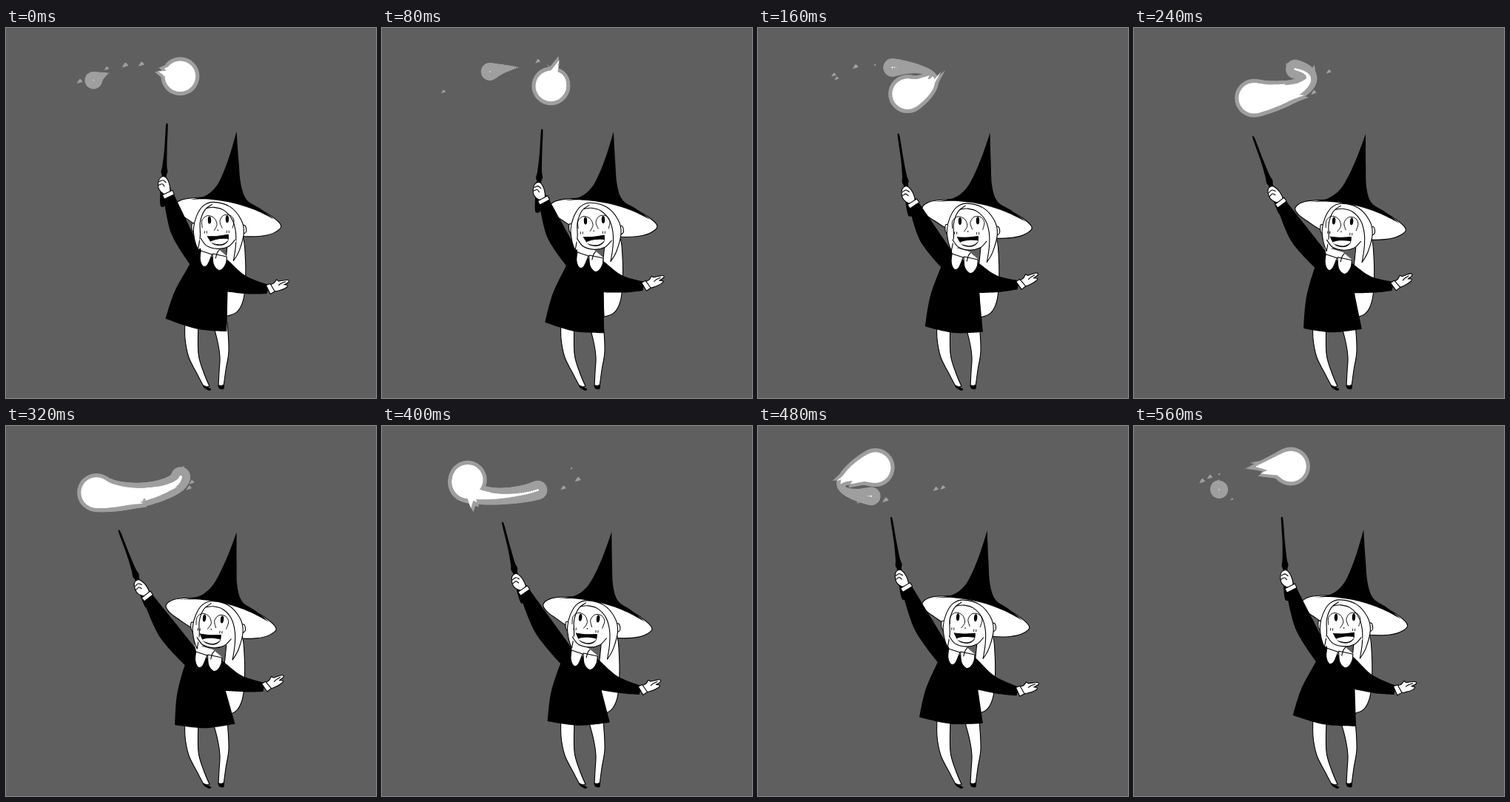
Write an HTML page with a canvas that moves like this. It is 500 px wide and 500 px high and loops after 0.64 s.

```html
<!DOCTYPE html>
<html lang="en">
<head>
<meta charset="utf-8">
<title>Little witch with a flame</title>
<style>
  html, body { margin: 0; width: 100%; height: 100%; overflow: hidden; background: #5f5f5f; }
  canvas { display: block; width: 100vw; height: 100vh; }
</style>
</head>
<body>
<canvas id="stage" width="500" height="500"></canvas>
<script>
const ctx = document.getElementById('stage').getContext('2d');
const BACK = '#5f5f5f', GRAY = '#9f9f9f', WHITE = '#fff', BLACK = '#000';
const STEP = 80, STEPS = 8;
const { sin, cos, PI } = Math;

const add = (p, q, k = 1) => [p[0] + q[0] * k, p[1] + q[1] * k];
const mix = (p, q, k = 0.5) => [p[0] + (q[0] - p[0]) * k, p[1] + (q[1] - p[1]) * k];
const sharp = (p) => [p[0], p[1], true];
const unit = (p, q) => {
  const d = add(q, p, -1), length = Math.hypot(...d);
  return [d[0] / length, d[1] / length];
};

// "x,y x,y! ..." : a smooth curve through the points, "!" makes a corner
const parse = (text) => text.split(' ').map((word) => {
  const [x, y] = word.replace('!', '').split(',').map(Number);
  return [x, y, word.endsWith('!')];
});

function curve(source, closed = true) {
  const pts = typeof source === 'string' ? parse(source) : source;
  const n = pts.length, path = new Path2D();
  const at = (i) => closed ? pts[(i + n) % n] : pts[Math.max(0, Math.min(n - 1, i))];
  const slope = (i) => at(i)[2] ? [0, 0] : add(at(i + 1), at(i - 1), -1);
  path.moveTo(pts[0][0], pts[0][1]);
  for (let i = 0; i < n - (closed ? 0 : 1); i++) {
    const end = at(i + 1);
    path.bezierCurveTo(...add(at(i), slope(i), 1 / 6), ...add(end, slope(i + 1), -1 / 6), end[0], end[1]);
  }
  if (closed) path.closePath();
  return path;
}

function fill(source, color, outline) {
  const path = curve(source);
  ctx.fillStyle = color;
  ctx.fill(path);
  if (outline) ctx.stroke(path);
}
const line = (source) => ctx.stroke(curve(source, false));

function dot([x, y], rx, ry, color) {
  ctx.fillStyle = color;
  ctx.beginPath();
  ctx.ellipse(x, y, rx, ry, 0, 0, 2 * PI);
  ctx.fill();
}

function group(transform, draw) {
  ctx.save();
  transform();
  draw();
  ctx.restore();
}
const shifted = (offset, draw) => group(() => ctx.translate(...offset), draw);

function seeded(seed) {
  return () => {
    seed = (seed * 16807 + 11) % 2147483647;
    return seed / 2147483647;
  };
}

// Every joint swings once per loop: middle + c * cos + s * sin
function poseAt(turn) {
  const swing = (middle, c, s) => middle + c * cos(turn) + s * sin(turn);
  return {
    tip: [swing(185, 32.4, 5) + 4.6 * sin(2 * turn), swing(135.4, -6, 11.2)],
    hand: [swing(197.5, 15.5, 4.4), swing(216, -3.2, 9.8)],
    hat: [swing(311.6, 0, 1.9), swing(142.5, -2, 0)],
    brimL: [swing(223, 5.5, 0), swing(237.5, -1, 1.6)],
    brimR: [swing(367.4, 3.3, 1.7), swing(269.2, -3.3, -1)],
    hemL: [swing(222, -6.3, 3.9), swing(398.4, -5.7, 4.9)],
    hemR: [swing(304, -5.6, 0), swing(406.3, 3.8, 4.5)],
    wrist: [swing(352, 2.6, 0.6), swing(353, 0, -5.7)],
    finger: [swing(378, 4.3, 0.5), swing(340.5, 1.6, -8.3)],
    torso: [swing(-2, 3.3, 2.2), swing(3, -2, 2)],
    hair: [swing(0.8, 0.6, 2.6), swing(1.1, -0.7, 1)],
    face: [swing(-3.3, 4.6, 1.9), swing(1.1, -0.7, 1)],
    tilt: swing(0.05, -0.07, -0.03),
  };
}

// The flame is a ribbon on a slanted ring; it thins out and tears in the middle
function drawFlame(turn, step) {
  const random = seeded(step * 977 + 41);
  const head = turn - 0.36 + 0.22 * cos(turn) - 0.11 * sin(turn);
  const ring = (angle, size = 1) => [
    174 + 62 * size * cos(angle),
    74 + 20 * size * sin(angle) - 6 * size * cos(angle),
  ];
  const place = (s) => ring(head - 2.6 * s);
  const girth = (s) => 26 - 13 * s - (14 + 10 * cos(turn)) * sin(PI * s);
  const core = (s) => girth(s) * 0.8 - 9 * s;
  const licks = Array.from({ length: 5 }, (_, i) => ({
    s: 0.08 + i * 0.17 + random() * 0.08, side: i % 2 ? 1 : -1, reach: 8 + random() * 10,
  }));

  for (const [width, color] of [[girth, GRAY], [core, WHITE]]) {
    for (let s = 0; s <= 1; s += 0.02) {
      const r = width(s);
      if (r > 0) dot(place(s), r, r, color);
    }
    for (const { s, side, reach } of licks) {
      const r = width(s);
      if (r < 4) continue;
      const p = place(s), back = unit(p, place(s + 0.05)), out = [-back[1] * side, back[0] * side];
      const apex = add(add(p, back, r * 0.8 + reach), out, r * 0.8);
      fill([sharp(add(p, out, r * 0.95)), sharp(apex), add(add(p, back, r * 0.9), out, r * 0.3), sharp(p)], color);
    }
  }

  for (let i = 0; i < 4; i++) {
    const p = ring(head - 1 - random() * 3, 1.2 + random() * 0.3), size = 1.5 + random() * 3;
    fill([sharp(add(p, [-size, size])), add(p, [0, -size * 0.6]), sharp(add(p, [size, size * 0.4]))], GRAY);
  }
}

function drawLegs() {
  fill('242,395! 242,420 247,445 258,467 268,486! 275,484! 267,465 260,440 260,398!', WHITE, true);
  fill('279,398! 286,424 289,445 288,465 287,484! 294,485! 297,462 301,436 299,398!', WHITE, true);
  fill('266,482! 272,485 277,488 275,490 269,487', BLACK);
  fill('287,482! 291,483 295,481! 294,488 288,487', BLACK);
}

function drawBackHair(p) {
  shifted(p.hair, () => fill('300,270! 318,280 322,310 322,345 319,368 311,383 297,389! 294,330!', WHITE, true));
}

function drawDress(p) {
  const body = (x, y) => add([x, y], p.torso);
  const armpit = body(247, 318);
  fill([
    sharp(body(258, 293)), armpit, add(mix(armpit, p.hemL), [-4, 0]), sharp(p.hemL),
    add(mix(p.hemL, p.hemR), [0, 5]), sharp(p.hemR),
    sharp(add([299, 356], p.torso, 0.4)), add(mix([299, 356], p.wrist), [2, 5]),
    sharp(add(p.wrist, [-2, 6])), sharp(add(p.wrist, [1, -6])),
    add(mix(body(298, 315), p.wrist), [-2, 1]), body(300, 314), sharp(body(283, 299)),
  ], BLACK);
}

function drawOpenHand(p) {
  const [dx, dy] = add(p.finger, p.wrist, -1);
  group(() => { ctx.translate(...p.wrist); ctx.rotate(Math.atan2(dy, dx)); }, () => {
    fill('4,-4 10,-5 15,-8! 17,-5! 22,-4 29,-2 29,1 22,2! 26,5 22,7 13,7 6,5', WHITE, true);
    line('15,0 19,-1 25,-1');
    fill('-1,-6! 5,-6! 7,6! 0,7!', WHITE, true);
  });
}

function drawCollar(p) {
  shifted(p.torso, () => {
    fill('260,290! 285,297! 298,308! 281,309! 264,306!', WHITE);
    fill('262,300! 261,312 265,321 271,319 277,305!', WHITE, true);
    fill('278,304! 279,318 285,326 291,325 296,317 297,308!', WHITE, true);
    line('287,299 284,303 282,310');
  });
}

const hatFrame = (p) => new DOMMatrix([
  ...add(p.brimR, p.brimL, -1), ...add(p.hat, p.brimL, -1), ...p.brimL,
]);

function drawHat(p) {
  const rest = hatFrame({ hat: [311, 140], brimL: [229, 236], brimR: [370, 266] });
  const m = hatFrame(p).multiply(rest.inverse());
  group(() => ctx.transform(m.a, m.b, m.c, m.d, m.e, m.f), () => {
    fill('228,240 237,232 255,229 280,229 310,234 346,247 370,265 365,275 346,281 315,281 270,272 244,257 233,249', WHITE, true);
    fill('311,139! 303,168 293,196 283,215 268,227 244,232! 270,231 305,236 336,246 362,259! 343,244 325,232 317,211 314,180', BLACK);
  });
}

function drawHead(p) {
  shifted(p.hair, () => {
    fill('317,266! 322,267 323,275 317,279!', WHITE, true);
    fill('254,264! 250,264 250,273 254,277!', WHITE, true);
    const cap = '258,299! 254,288 252,271 256,254 265,240 279,235 301,241 316,258 320,276 314,300 306,314!';
    fill(cap + ' 303,292! 285,298 270,294', WHITE);
    line(cap);
    line('277,238 267,246 261,262 261,281 258,299');
    line('270,243 280,242 293,246 304,258 309,275 309,294 306,314');
  });
  shifted(mix(p.hair, p.face), () => {
    const chin = '262,284 270,294 285,298 299,295 308,286';
    fill(chin, WHITE);
    line(chin);
  });
  drawFace(p);
}

function drawFace(p) {
  group(() => {
    ctx.translate(285 + p.face[0], 275 + p.face[1]);
    ctx.rotate(p.tilt);
    ctx.translate(-285, -275);
    ctx.lineWidth = 0.9;
  }, () => {
    line('264,269 264,259 271,253 280,256 284,265 280,273');
    line('291,270 288,261 293,253 302,253 307,260 305,270');
    dot([274, 259], 2.2, 5, BLACK);
    dot([298, 258], 2.2, 5, BLACK);
    dot([285, 273], 0.8, 0.8, BLACK);
    for (const x of [267, 270, 297, 300]) line([[x, 274], [x, 276.5]]);
    fill('271,281! 284,281 299,279! 298,288 290,293 278,291', BLACK, true);
    fill('275,288 285,285 298,285 296,289 289,292 280,291', WHITE);
  });
}

function drawWandArm(p) {
  const shoulder = add([253, 300], p.torso);
  const along = unit(p.hand, shoulder), across = [along[1], -along[0]];
  const cuff = add(p.hand, along, 17), root = add(cuff, along, -6);
  const side = (point, k) => add(point, across, k);
  const band = (a, b, left, right) =>
    fill([side(a, -left), side(a, right), side(b, right), side(b, -left)].map(sharp), WHITE, true);
  const front = add([258, 291], p.torso), back = add([247, 318], p.torso);
  const cuffL = side(cuff, -7.5), cuffR = side(cuff, 7.5);

  fill([
    sharp(cuffR), mix(cuffR, front), sharp(front), sharp(add([268, 312], p.torso)),
    sharp(back), side(mix(cuffL, back), -8), sharp(cuffL),
  ], BLACK);

  const [wx, wy] = add(p.tip, p.hand, -1);
  const inHand = (draw) => group(() => {
    ctx.translate(...p.hand);
    ctx.rotate(Math.atan2(wy, wx) + PI / 2);
  }, draw);
  inHand(() => fill('0,-84 1.5,-80 2,-50 3,-27 4.5,-19 3,-12 4,10 4,25 1,29 -3,27 -4,12 -3,-12 -4.5,-18 -3,-27 -1.5,-50 -1.2,-80', BLACK));
  band(p.hand, root, 5, 6);
  inHand(() => {
    fill('-7,-6 -4,-11 1,-12 5,-8 8,-1 9,8 4,12 -3,9 -7,3', WHITE, true);
    line('-6,-5 -1,-7 3,-4');
    line('-7,0 -2,-2 1,1');
  });
  band(root, cuff, 7, 8);
}

function drawScene(step) {
  const turn = 2 * PI * step / STEPS, p = poseAt(turn);
  ctx.fillStyle = BACK;
  ctx.fillRect(0, 0, 500, 500);
  ctx.strokeStyle = BLACK;
  ctx.lineWidth = 1.1;
  ctx.lineJoin = ctx.lineCap = 'round';
  drawFlame(turn, step);
  drawHat(p);
  drawBackHair(p);
  drawLegs();
  drawDress(p);
  drawOpenHand(p);
  drawWandArm(p);
  drawCollar(p);
  drawHead(p);
}

const start = performance.now();
function tick() {
  drawScene(Math.floor((performance.now() - start) / STEP) % STEPS);
  requestAnimationFrame(tick);
}
tick();
</script>
</body>
</html>
```
